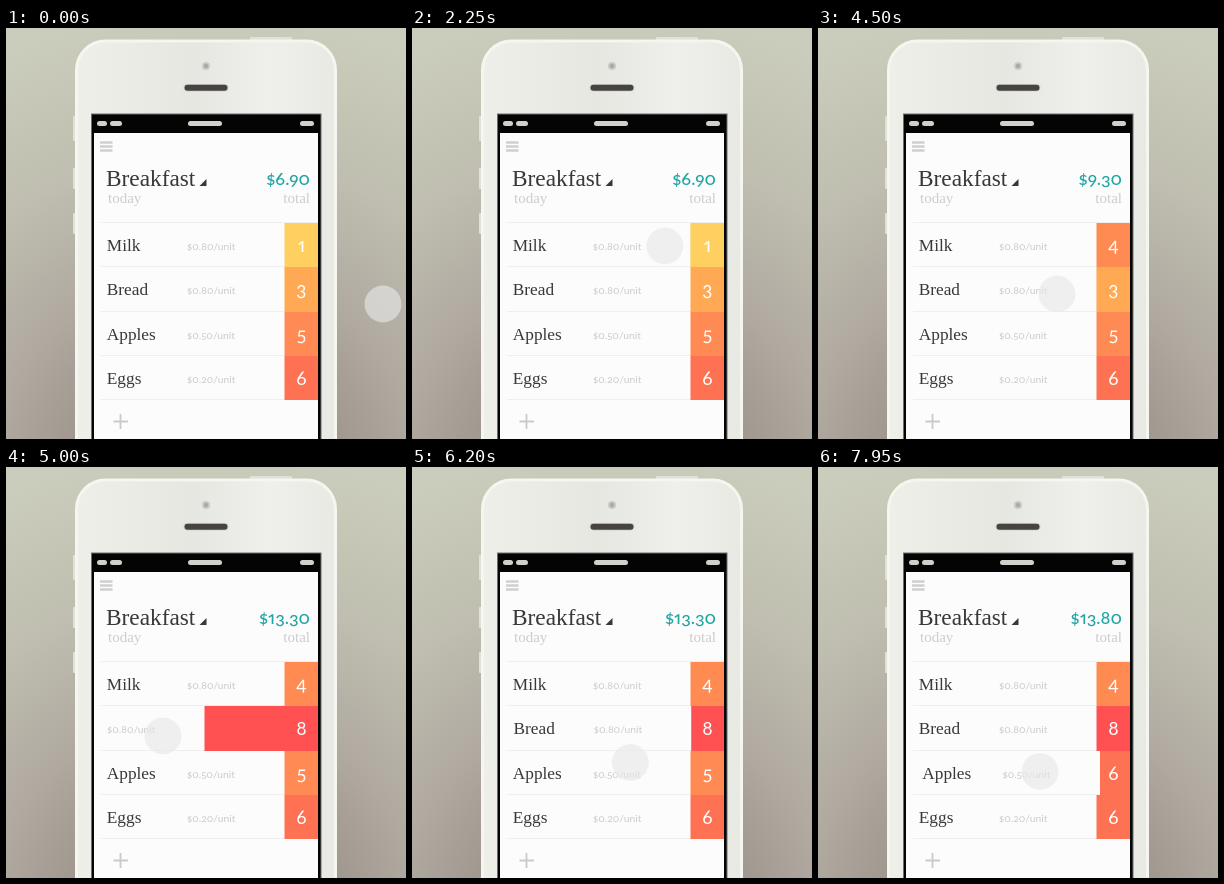
An HTML page for the animation above (8000 ms loop, 400x411 px).

```html
<!DOCTYPE html>
<html lang="en">
<head>
<meta charset="utf-8">
<title>Breakfast list</title>
<style>
  html, body { margin: 0; width: 100%; height: 100%; overflow: hidden; }
  svg { display: block; width: 400px; height: 411px; }
  .serif { font-family: "Liberation Serif", serif; fill: #383838; }
  .sans { font-family: Lato, sans-serif; font-feature-settings: "onum", "pnum"; }
  .title { font-size: 23.3px; }
  .hint { font-size: 15px; fill: #cdcdcd; }
  .total { font-size: 18px; font-weight: 500; fill: #22a5a5; }
  .name { font-size: 17.3px; }
  .unit { font-size: 10.3px; fill: #cbcbcb; }
  .count { font-size: 19px; fill: #fff; }
  .end { text-anchor: end; }
  .mid { text-anchor: middle; }
</style>
</head>
<body>
<svg viewBox="0 0 400 411">
  <defs>
    <radialGradient id="wall" gradientUnits="userSpaceOnUse" cx="200" cy="450" r="470">
      <stop offset=".2" stop-color="#988e86"/>
      <stop offset=".45" stop-color="#b0a9a0"/>
      <stop offset=".7" stop-color="#bfbeb0"/>
      <stop offset="1" stop-color="#cbcdbc"/>
    </radialGradient>
    <linearGradient id="shell">
      <stop offset="0" stop-color="#eeefe9"/>
      <stop offset=".45" stop-color="#e7e7e2"/>
      <stop offset=".75" stop-color="#efefeb"/>
      <stop offset="1" stop-color="#e9e9e4"/>
    </linearGradient>
    <clipPath id="screen"><rect x="88" y="105" width="224" height="306"/></clipPath>
  </defs>

  <rect width="400" height="411" fill="url(#wall)"/>

  <g fill="#e0e1d9">
    <rect x="244" y="9" width="42" height="5" rx="1"/>
    <rect x="67" y="88" width="4" height="25" rx="1"/>
    <rect x="67" y="140" width="4" height="21" rx="1"/>
    <rect x="67" y="185" width="4" height="21" rx="1"/>
  </g>
  <rect x="70.500" y="13" width="259" height="440" rx="29" fill="url(#shell)" stroke="#f5f6f0" stroke-width="3"/>
  <circle cx="200" cy="38" r="4" fill="#c9c9c5"/>
  <circle cx="200" cy="38" r="2.200" fill="#aaa9a7"/>
  <rect x="177.500" y="56" width="45" height="7.500" rx="3.700" fill="#d2d2cd"/>
  <rect x="178.500" y="56.800" width="43" height="6" rx="3" fill="#464340"/>

  <rect x="85" y="85.500" width="230.500" height="340" fill="#69706c"/>
  <rect x="86" y="86.500" width="228.500" height="340" fill="#040404"/>
  <g fill="#d0d1ca">
    <rect x="91" y="93" width="10" height="5" rx="2.500"/>
    <rect x="104" y="93" width="12" height="5" rx="2.500"/>
    <rect x="182" y="93" width="34" height="5" rx="2.500"/>
    <rect x="294" y="93" width="14" height="5" rx="2.500"/>
  </g>

  <g clip-path="url(#screen)">
    <rect x="88" y="105" width="224" height="306" fill="#fcfcfc"/>
    <path d="M94 114.500h12.500M94 118.500h12.500M94 122.500h12.500" stroke="#cfcfcf" stroke-width="2.400"/>
    <text class="serif title" x="100" y="158">Breakfast</text>
    <path d="M200.500 151v7h-7z" fill="#383838"/>
    <text class="serif hint" x="102" y="175">today</text>
    <text class="serif hint end" x="304" y="175">total</text>
    <text class="sans total end" id="total" x="304" y="157"></text>
    <path d="M95 194.500h217M95 238.500h217M95 283.500h217M95 327.500h217M95 371.500h217" stroke="#efefef"/>
    <g id="rows"></g>
    <path d="M107.500 393.500h14.500M114.500 386v15" stroke="#cacaca" stroke-width="1.800"/>
  </g>

  <circle id="touch" r="18.500" fill="#e8e8e8" fill-opacity=".62"/>
</svg>

<script>
  const LOOP = 8000, TICK = 50, STEP = 16, SETTLE = 880;
  const COLORS = ["", "#ffcf60", "#ffbc5a", "#ffa955", "#ff8b52", "#ff8a53", "#ff7153", "#ff6052", "#ff5151"];

  // Each drag pulls a row left, holds it, then lets it spring back.
  const items = [
    { name: "Milk", price: 0.8, count: 1, drag: { from: 2230, to: 2750, drop: 3200, add: 3 } },
    { name: "Bread", price: 0.8, count: 3, drag: { from: 4490, to: 5000, drop: 5500, add: 5 } },
    { name: "Apples", price: 0.5, count: 5, drag: { from: 6840, to: 7190, drop: 7600, add: 1 } },
    { name: "Eggs", price: 0.2, count: 6 }
  ];

  // Touch path: [start, end, x0, y0, x1, y1, easing]
  const easeOut = p => 1 - (1 - p) ** 3;
  const easeInOut = p => p < 0.5 ? 2 * p * p : 1 - 2 * (1 - p) ** 2;
  const moves = [
    [1310, 2150, 377, 276, 253, 218, easeOut],
    [2230, 2750, 253, 218, 206, 220, easeInOut],
    [3450, 4250, 206, 220, 239, 266, easeOut],
    [4490, 5000, 239, 266, 157, 269, easeInOut],
    [5880, 6750, 157, 269, 239, 304.5, easeOut],
    [6840, 7190, 239, 304.5, 222, 304.5, easeInOut]
  ];

  const $ = id => document.getElementById(id);
  const part = (t, a, b) => Math.min(1, Math.max(0, (t - a) / (b - a)));
  const rowTop = i => Math.round(195 + i * 44.25);

  function add(parent, tag, attrs, text = "") {
    const el = document.createElementNS("http://www.w3.org/2000/svg", tag);
    for (const key in attrs) el.setAttribute(key, attrs[key]);
    el.textContent = text;
    return parent.appendChild(el);
  }

  items.forEach((item, i) => {
    const y = rowTop(i);
    item.cell = add($("rows"), "rect", { y, height: rowTop(i + 1) - y });
    item.label = add($("rows"), "g", {});
    add(item.label, "text", { class: "serif name", x: 100.8, y: y + 27.5 }, item.name);
    add(item.label, "text", { class: "sans unit", x: 181, y: y + 27.2 }, `$${item.price.toFixed(2)}/unit`);
    item.num = add($("rows"), "text", { class: "sans count mid", x: 295.4, y: y + 28.5 });
  });

  function pull(drag, t) {
    if (!drag) return 0;
    const size = -STEP * drag.add, s = t - drag.drop;
    if (s <= 0) return size * easeInOut(part(t, drag.from, drag.to));
    if (s >= SETTLE) return 0;
    return size * Math.exp(-0.0017 * s) * (1 - s / SETTLE) * Math.cos(Math.PI * s / 275);
  }

  function countAt({ count, drag }, t) {
    if (!drag) return count;
    return count + Math.round(drag.add * easeInOut(part(t, drag.from, drag.to)));
  }

  function draw(t) {
    let total = 0;
    for (const item of items) {
      const x = pull(item.drag, t), n = countAt(item, t);
      total += n * item.price;
      item.label.setAttribute("transform", `translate(${x.toFixed(2)})`);
      item.cell.setAttribute("x", 278.5 + x);
      item.cell.setAttribute("width", Math.max(0, 33.5 - x));
      item.cell.setAttribute("fill", COLORS[n]);
      item.num.textContent = n;
    }
    $("total").textContent = "$" + total.toFixed(2);

    const [a, b, x0, y0, x1, y1, ease] = moves.filter(m => t >= m[0]).pop() || moves[0];
    const p = ease(part(t, a, b));
    $("touch").setAttribute("cx", x0 + (x1 - x0) * p);
    $("touch").setAttribute("cy", y0 + (y1 - y0) * p);
  }

  const start = performance.now();
  function frame() {
    const t = (performance.now() - start) % LOOP;
    draw(Math.floor(t / TICK) * TICK);
    requestAnimationFrame(frame);
  }
  frame();
</script>
</body>
</html>
```
